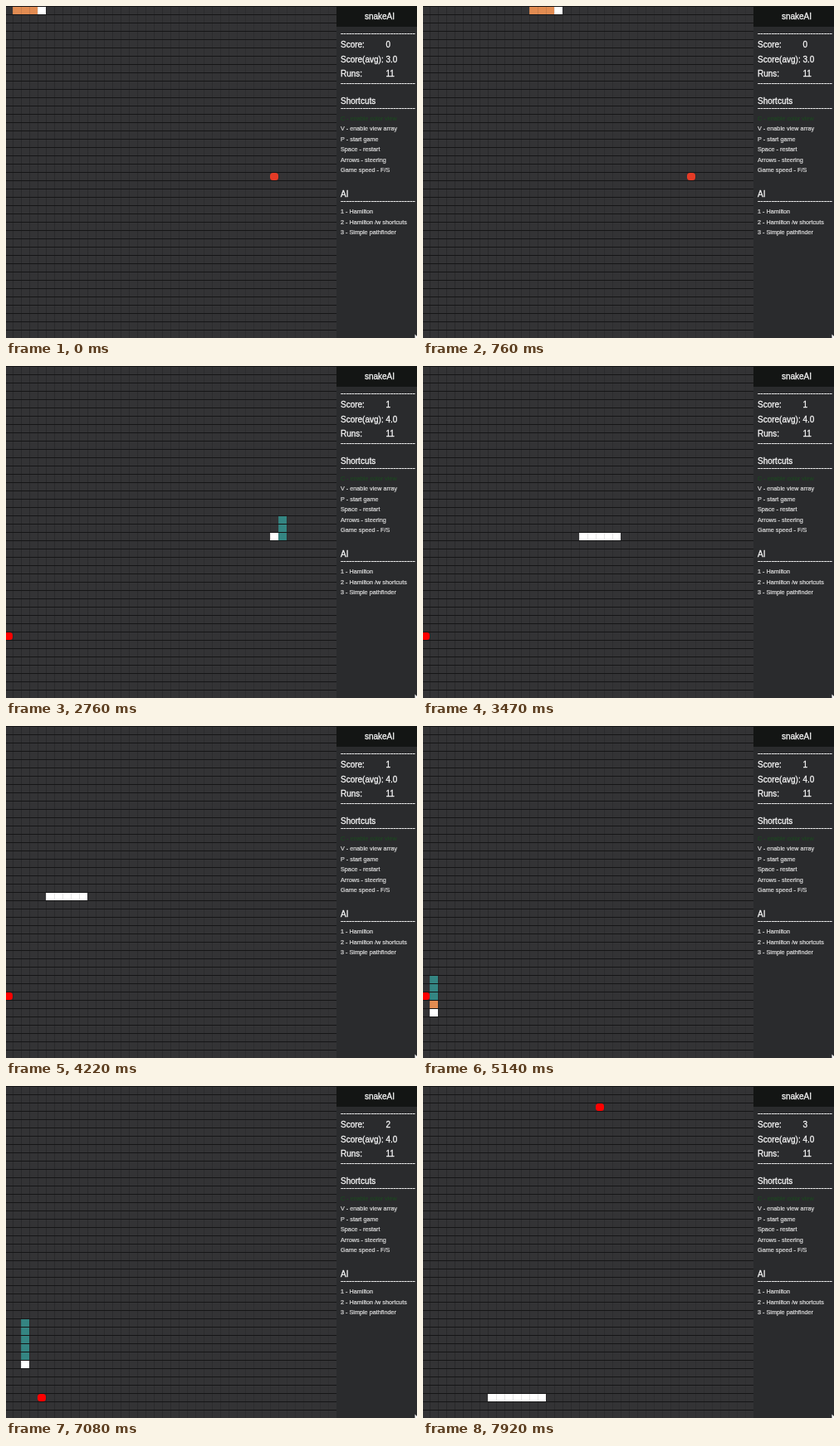
An HTML page with a canvas that plays this animation: 495 px wide and 400 px high, repeating every 8 s.

```html
<!DOCTYPE html>
<html lang="en">
<head>
<meta charset="utf-8">
<title>snakeAI</title>
<style>
html, body { margin: 0; width: 100%; height: 100%; overflow: hidden; background: #333335; }
canvas { display: block; }
</style>
</head>
<body>
<canvas id="stage" width="495" height="400"></canvas>
<script>
const ctx = document.getElementById('stage').getContext('2d');
const LOOP = 8000, FRAME = 1000 / 13, LAST = 103;
const CELLS_PER_FRAME = 1.4458, HITCH = 460, HITCH_LENGTH = 117;
const CELL = 10, LEFT = -2, TOP = 1, PANEL = 398, START_LENGTH = 4;
const ORANGE = '#e28c52', TEAL = '#348582', WHITE = '#ffffff', RED = '#ff0000', LIGHT = '#f8f8f8';

// Turns of the route in grid cells, with the colour of the leg leading there
const legs = [
  [1, 0, ORANGE], [32, 0, ORANGE], [33, 20, TEAL], [1, 20, WHITE], [1, 32, TEAL],
  [1, 34, ORANGE], [0, 34, ORANGE], [0, 17, ORANGE], [2, 17, WHITE], [2, 37, TEAL], [14, 37, WHITE]
];
const foods = [[32, 20, '#e53b26'], [0, 32, RED], [4, 37, RED], [21, 2, RED]];

// Each leg runs sideways first, then down or up
const route = [legs[0]];
for (const [toX, toY, color] of legs.slice(1)) {
  let [x, y] = route[route.length - 1];
  while (x !== toX || y !== toY) {
    if (x !== toX) x += Math.sign(toX - x);
    else y += Math.sign(toY - y);
    route.push([x, y, color]);
  }
}

const meals = foods.slice(0, -1).map(([fx, fy]) => route.findIndex(([x, y]) => x === fx && y === fy));

// Steady pace on whole frames, with one short hitch near the start
function headAt(t) {
  const time = Math.min(LAST, Math.floor(t / FRAME + 0.2)) * FRAME;
  const paused = Math.max(0, Math.min(HITCH_LENGTH, time - HITCH));
  const steps = Math.floor((time - paused) / FRAME * CELLS_PER_FRAME + 0.4);
  return Math.min(route.length - 1, START_LENGTH - 1 + steps);
}

function rect(color, x, y, w, h) {
  ctx.fillStyle = color;
  ctx.fillRect(x, y, w, h);
}

function text(str, x, y, size = 10, color = LIGHT, align = 'left') {
  ctx.font = size + 'px "Liberation Sans", Arial, sans-serif';
  ctx.textAlign = align;
  ctx.fillStyle = ctx.strokeStyle = color;
  ctx.lineWidth = size * 0.03;
  ctx.fillText(str, x, y);
  ctx.strokeText(str, x, y);
}

function drawGrid() {
  rect('#333335', 0, 0, PANEL, 400);
  const fade = ctx.createLinearGradient(0, 0, PANEL, 0);
  fade.addColorStop(0, '#28282a');
  fade.addColorStop(1, '#2f2f31');
  for (let x = 8; x < PANEL; x += CELL) rect(fade, x, 0, 1, 400);
  for (let y = 0; y < 400; y += CELL) rect('#151516', 0, y, PANEL, 1);
}

function drawSnake(head) {
  const length = START_LENGTH + meals.filter(m => head > m).length;
  for (let i = head - length + 1; i <= head; i++) {
    const [x, y, color] = route[i];
    const px = LEFT + x * CELL, py = TOP + y * CELL;
    rect(i === head ? WHITE : color, px, py, CELL, 9);
    rect('rgba(40,40,42,.12)', px, py, 1, 9);
  }
}

function drawFood([x, y, color]) {
  ctx.fillStyle = color;
  ctx.beginPath();
  ctx.roundRect(LEFT + x * CELL, TOP + y * CELL, CELL, 9, 3.5);
  ctx.fill();
}

function drawPanel(score) {
  rect('#2a2b2d', PANEL, 0, 97, 400);
  rect('#131514', PANEL, 0, 97, 25);
  text('snakeAI', 450, 15.5, 10, LIGHT, 'center');
  for (const y of [35.5, 95.5, 125.5, 238]) text('-'.repeat(27), 403, y);

  const stats = [['Score:', score], ['Score(avg):', score ? '4.0' : '3.0'], ['Runs:', 11]];
  stats.forEach(([label, value], i) => {
    const y = 50 + i * 17.5;
    text(label, 403, y);
    text(value, 457.5, y);
  });

  text('Shortcuts', 403, 118);
  text('AI', 403, 230);
  const keys = ['C - enable color view', 'V - enable view array', 'P - start game',
    'Space - restart', 'Arrows - steering', 'Game speed - F/S'];
  keys.forEach((s, i) => text(s, 403, 137.5 + i * 12.5, 7.25, i ? '#dcdcdc' : '#1e4522'));
  const modes = ['1 - Hamilton', '2 - Hamilton /w shortcuts', '3 - Simple pathfinder'];
  modes.forEach((s, i) => text(s, 403, 250 + i * 12.5, 7.25, '#dcdcdc'));

  // Tip of the mouse pointer
  ctx.fillStyle = WHITE;
  ctx.beginPath();
  ctx.moveTo(492.5, 395.5);
  ctx.lineTo(495, 398);
  ctx.lineTo(495, 400);
  ctx.lineTo(492.5, 400);
  ctx.fill();
}

function draw(t) {
  const head = headAt(t % LOOP);
  const score = meals.filter(m => head >= m).length;
  drawGrid();
  drawFood(foods[score]);
  drawSnake(head);
  drawPanel(score);
}

const start = performance.now();
function loop() {
  draw(performance.now() - start);
  requestAnimationFrame(loop);
}
loop();
</script>
</body>
</html>
```
